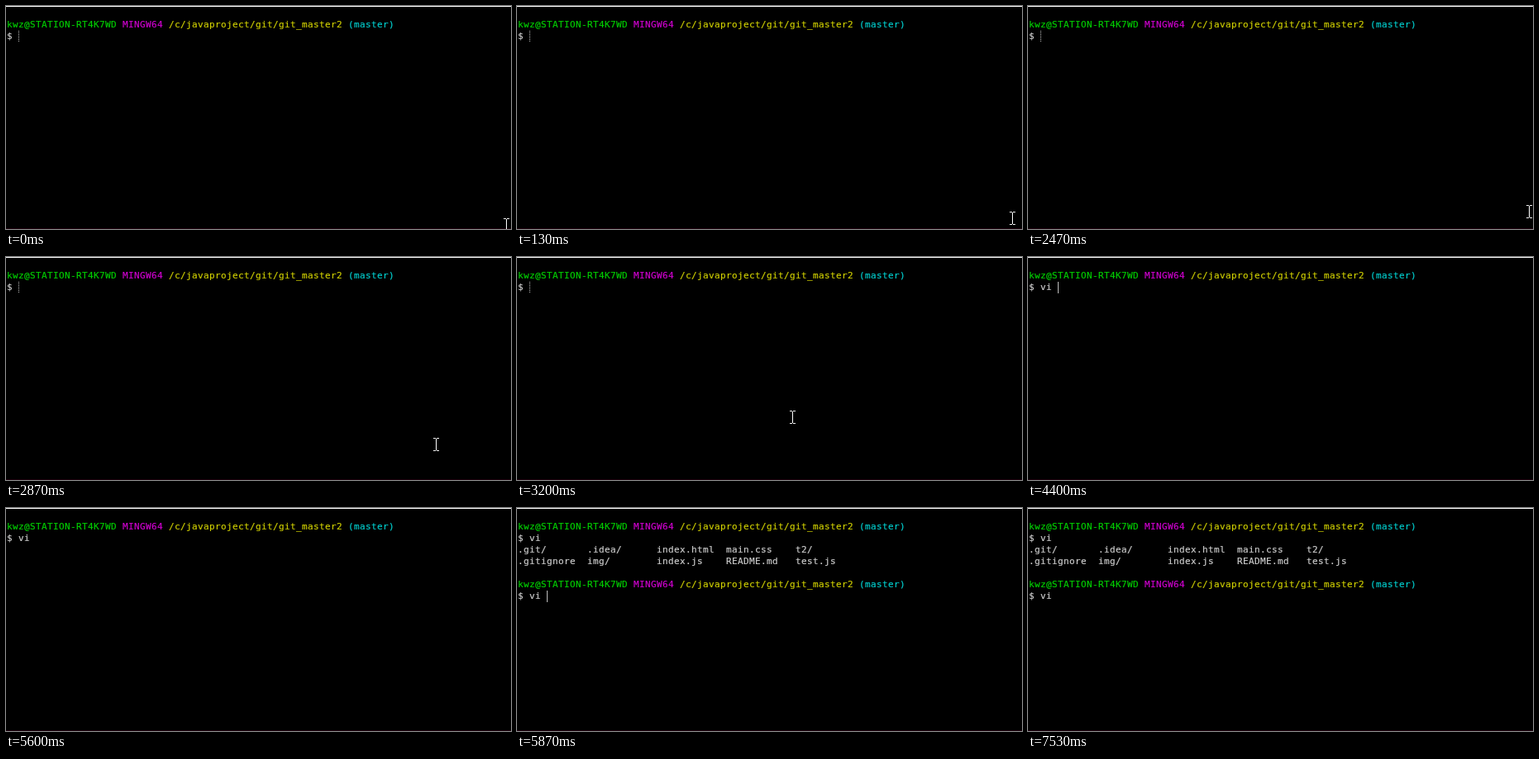
These frames come from a looping animation (611x270 px, 8000 ms). An HTML page with a canvas:

```html
<!DOCTYPE html>
<html lang="en">
<head>
<meta charset="utf-8">
<title>Terminal</title>
<style>
  html, body { margin: 0; width: 611px; height: 270px; overflow: hidden; background: #000; }
  canvas { display: block; }
</style>
</head>
<body>
<canvas id="stage" width="611" height="270"></canvas>
<script>
const ctx = document.getElementById('stage').getContext('2d');
const LOOP = 8000;
const CELL = 7, ROW = 14, LEFT = 1, TOP = 16;
const GREY = '#bfbfbf', TEXT = '#cccccc';

const PROMPT = [
  [0, 'kwz@STATION-RT4K7WD', '#00cc00'],
  [20, 'MINGW64', '#cc00cc'],
  [28, '/c/javaproject/git/git_master2', '#cccc00'],
  [59, '(master)', '#00cccc']
];
const FILES = [
  ['.git/', '.idea/', 'index.html', 'main.css', 't2/'],
  ['.gitignore', 'img/', 'index.js', 'README.md', 'test.js']
];

// [start time, stem x, top y]; no position means hidden
const POINTER = [
  [0, 605, 257], [70, 602, 253], [130, 599, 249],
  [2470, 606, 241], [2530],
  [2800, 601, 155], [2870, 520, 219],
  [3070, 467, 211], [3130, 402, 200], [3200, 333, 186],
  [3270, 262, 158], [3330, 199, 131], [3870]
];
// [start time, typed text]
const TYPING = [[0, ''], [3870, 'v'], [4200, 'vi'], [4400, 'vi ']];
// [start time, caret look]
const CARET = [
  [0, 'dotted'], [3400, 'on'], [4930, 'off'], [5000, 'on'], [5600, 'off'],
  [5870, 'on'], [6470, 'off'], [7000, 'on'], [7530, 'off']
];
const LISTED = 5870;

function at(track, t) {
  let now = track[0];
  for (const step of track) if (step[0] <= t) now = step;
  return now;
}

// One glyph per terminal cell, thickened slightly by a hairline
function write(col, row, text, color) {
  ctx.fillStyle = ctx.strokeStyle = color;
  const y = TOP + row * ROW + 10;
  [...text].forEach((glyph, i) => {
    const x = LEFT + (col + i) * CELL;
    ctx.fillText(glyph, x, y);
    ctx.strokeText(glyph, x, y);
  });
}

function prompt(row, typed) {
  for (const [col, text, color] of PROMPT) write(col, row, text, color);
  write(0, row + 1, '$ ' + typed, TEXT);
}

function caret(col, row, look) {
  if (look === 'off') return;
  const x = LEFT + col * CELL, y = TOP + row * ROW;
  ctx.fillStyle = GREY;
  if (look === 'on') ctx.fillRect(x, y, 1, ROW);
  else for (let i = 0; i < ROW; i += 2) ctx.fillRect(x, y + i, 1, 1);
}

function pointer(x, y) {
  ctx.fillStyle = '#fff';
  for (const end of [y, y + 15]) {
    ctx.fillRect(x - 3, end, 3, 1);
    ctx.fillRect(x + 1, end, 3, 1);
  }
  ctx.fillRect(x, y + 1, 1, 14);
}

function draw(t) {
  ctx.fillStyle = '#000';
  ctx.fillRect(0, 0, 611, 270);
  ctx.fillStyle = '#fff';
  ctx.fillRect(0, 0, 611, 1);
  ctx.fillStyle = '#1c000c';
  ctx.fillRect(0, 269, 611, 1);

  ctx.font = '11px "DejaVu Sans Mono", monospace';
  ctx.textBaseline = 'alphabetic';
  ctx.lineWidth = 0.2;
  const typed = at(TYPING, t)[1];
  let row = 0;
  prompt(row, typed);
  if (t >= LISTED) {
    FILES.forEach((names, r) =>
      names.forEach((name, c) => write(c * 12, r + 2, name, TEXT)));
    row = 5;
    prompt(row, typed);
  }
  caret(2 + typed.length, row + 1, at(CARET, t)[1]);

  const [, x, y] = at(POINTER, t);
  if (x !== undefined) pointer(x, y);
}

const start = performance.now();
function tick() {
  draw((performance.now() - start) % LOOP);
  requestAnimationFrame(tick);
}
tick();
</script>
</body>
</html>
```
